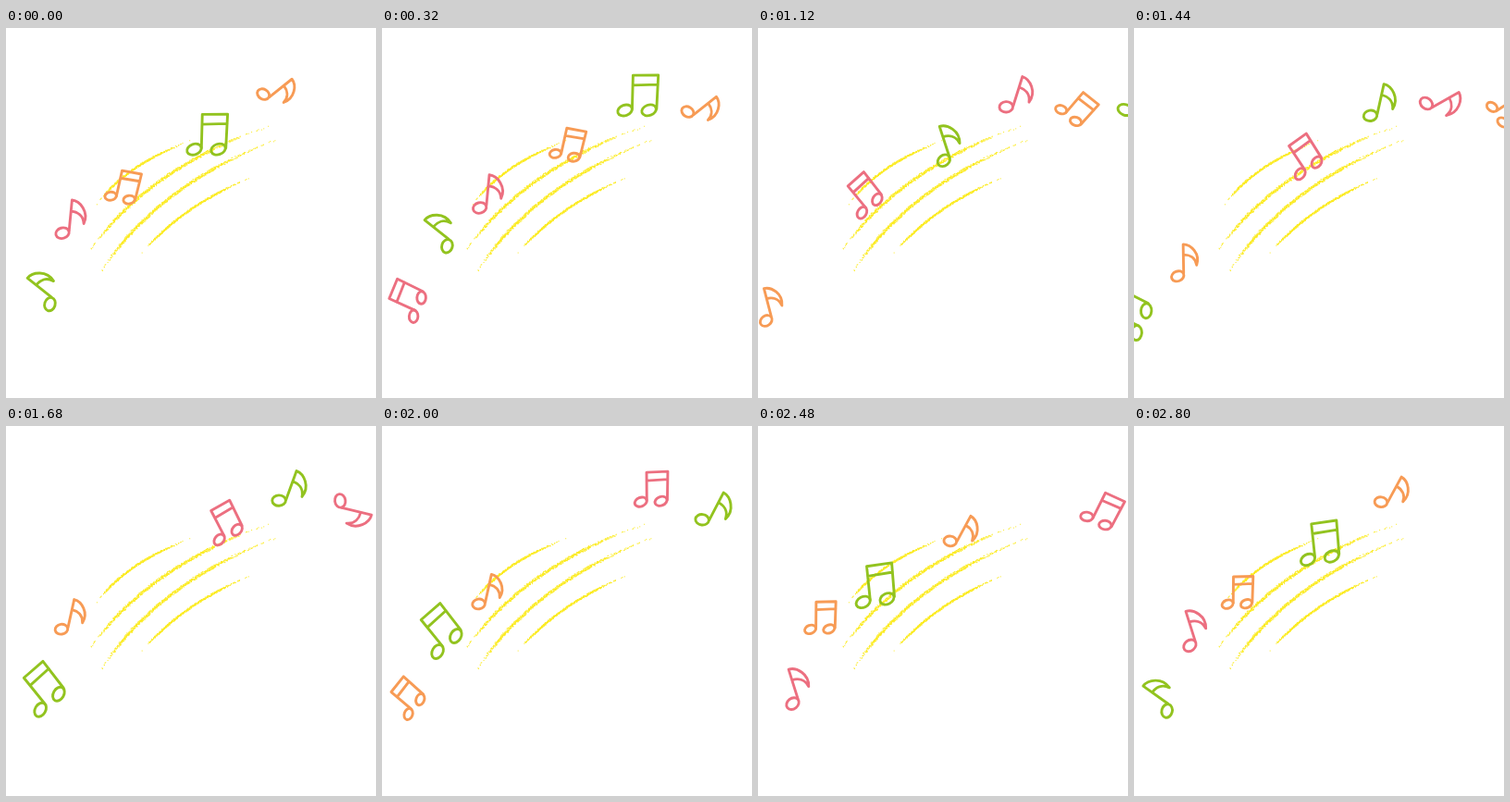
Write an HTML page with a canvas that moves like this. It is 400 px wide and 400 px high and loops after 2.88 s.

```html
<!DOCTYPE html>
<html>
<head>
<meta charset="utf-8">
<style>
html, body { margin: 0; height: 100%; overflow: hidden; background: #fff; }
canvas { display: block; }
</style>
</head>
<body>
<canvas id="stage" width="400" height="400"></canvas>
<script>
const ctx = document.getElementById('stage').getContext('2d');
const STEP = 80, STEPS = 36, BEAT = 5;
const ORANGE = '#f79b55', GREEN = '#92c31f', PINK = '#ec6f80', YELLOW = '#fbea1e';

// Points that every note passes, one per beat
const route = [
  [-110, 340], [-38, 318], [40, 283], [70, 207], [129, 172],
  [221, 115], [294, 68], [360, 91], [436, 87], [510, 90]
];

// Notes follow one another a beat apart; tilts are key angles two beats apart
const notes = [
  { draw: single, color: ORANGE, scale: .94, tilts: [-14, 13, 29, 75] },
  { draw: double, color: GREEN, scale: 1, tilts: [-64, -13, 2, 43] },
  { draw: double, color: ORANGE, scale: .78, tilts: [-49, 1, 25, 57] },
  { draw: single, color: PINK, scale: 1, tilts: [-40, 6, 18, 104] },
  { draw: single, color: GREEN, scale: 1, tilts: [-54, -48, 13, 28] },
  { draw: double, color: PINK, scale: .84, tilts: [-65, -39, -27, 27] }
];

function head(x, y, rx) {
  ctx.beginPath();
  ctx.ellipse(x, y, rx, 5.7, -.38, 0, 7);
  ctx.stroke();
}

function single() {
  head(-7.4, 15.6, 7.3);
  ctx.beginPath();
  ctx.moveTo(-.5, 12);
  ctx.lineTo(-.8, -21);
  ctx.bezierCurveTo(8, -21, 19, -10, 14.5, 3);
  ctx.bezierCurveTo(13, -6, 6, -9, -.5, -9);
  ctx.stroke();
}

function double() {
  head(-17, 16.8, 8);
  head(9, 15.8, 8);
  ctx.beginPath();
  ctx.moveTo(-9.2, 15);
  ctx.lineTo(-9.5, -21.3);
  ctx.lineTo(17.8, -22.5);
  ctx.lineTo(17.2, 14);
  ctx.moveTo(-9.5, -10.6);
  ctx.lineTo(17.8, -12.3);
  ctx.stroke();
}

function spline(a, b, c, d, t) {
  const m = (c - a) / 2, n = (d - b) / 2;
  return b + t * (m + t * (3 * (c - b) - 2 * m - n + t * (2 * (b - c) + m + n)));
}

// Smooth position after a number of beats on the route
function place(beats) {
  const i = Math.floor(beats), [a, b, c, d] = route.slice(i, i + 4);
  return [0, 1].map(k => spline(a[k], b[k], c[k], d[k], beats - i));
}

// The tilt stays still during a beat and jumps to the next
function tiltAt(tilts, beats) {
  const k = Math.min(6, Math.floor(beats)) / 2;
  return (tilts[Math.floor(k)] + tilts[Math.ceil(k)]) / 2;
}

// Chalk staff lines, painted once
const staff = document.createElement('canvas');
staff.width = staff.height = 400;
const chalk = staff.getContext('2d');
let seed = 7;
const random = () => (seed = seed * 16807 % 2147483647) / 2147483647;

function chalkLine(x0, y0, cx, cy, x1, y1, width) {
  const count = Math.hypot(x1 - x0, y1 - y0) * 5;
  for (let i = 0; i < count; i++) {
    const t = i / count, u = 1 - t;
    const density = Math.min(1, t / .22, u / .28);
    if (random() > density ** 2 + .04) continue;
    const spread = width * (.5 + .5 * density);
    const x = u * u * x0 + 2 * u * t * cx + t * t * x1;
    const y = u * u * y0 + 2 * u * t * cy + t * t * y1;
    chalk.fillRect(x + (random() - .5) * spread - .5, y + (random() - .5) * spread - .5, 1, 1);
  }
}
chalk.fillStyle = YELLOW;
chalkLine(98, 191, 130, 147, 202, 121, 1.9);
chalkLine(88, 244, 153.5, 151, 285, 106, 2.9);
chalkLine(100, 268, 160, 171.5, 292, 121, 2.9);
chalkLine(147, 243, 191, 192, 268, 160, 1.9);

function render(now) {
  const frame = Math.floor(now / STEP);
  ctx.fillStyle = '#fff';
  ctx.fillRect(0, 0, 400, 400);
  ctx.drawImage(staff, 0, 0);
  ctx.lineCap = ctx.lineJoin = 'round';
  notes.forEach(({ draw, color, scale, tilts }, i) => {
    const beats = (frame + STEPS * 2 - 11 - i * BEAT) % STEPS / BEAT;
    if (beats >= 7) return;
    ctx.save();
    ctx.translate(...place(beats));
    ctx.rotate(tiltAt(tilts, beats) * Math.PI / 180);
    ctx.scale(scale, scale);
    ctx.strokeStyle = color;
    ctx.lineWidth = 2.9 / scale;
    draw();
    ctx.restore();
  });
}

const begin = performance.now();
function tick() {
  render(performance.now() - begin);
  requestAnimationFrame(tick);
}
tick();
</script>
</body>
</html>
```
